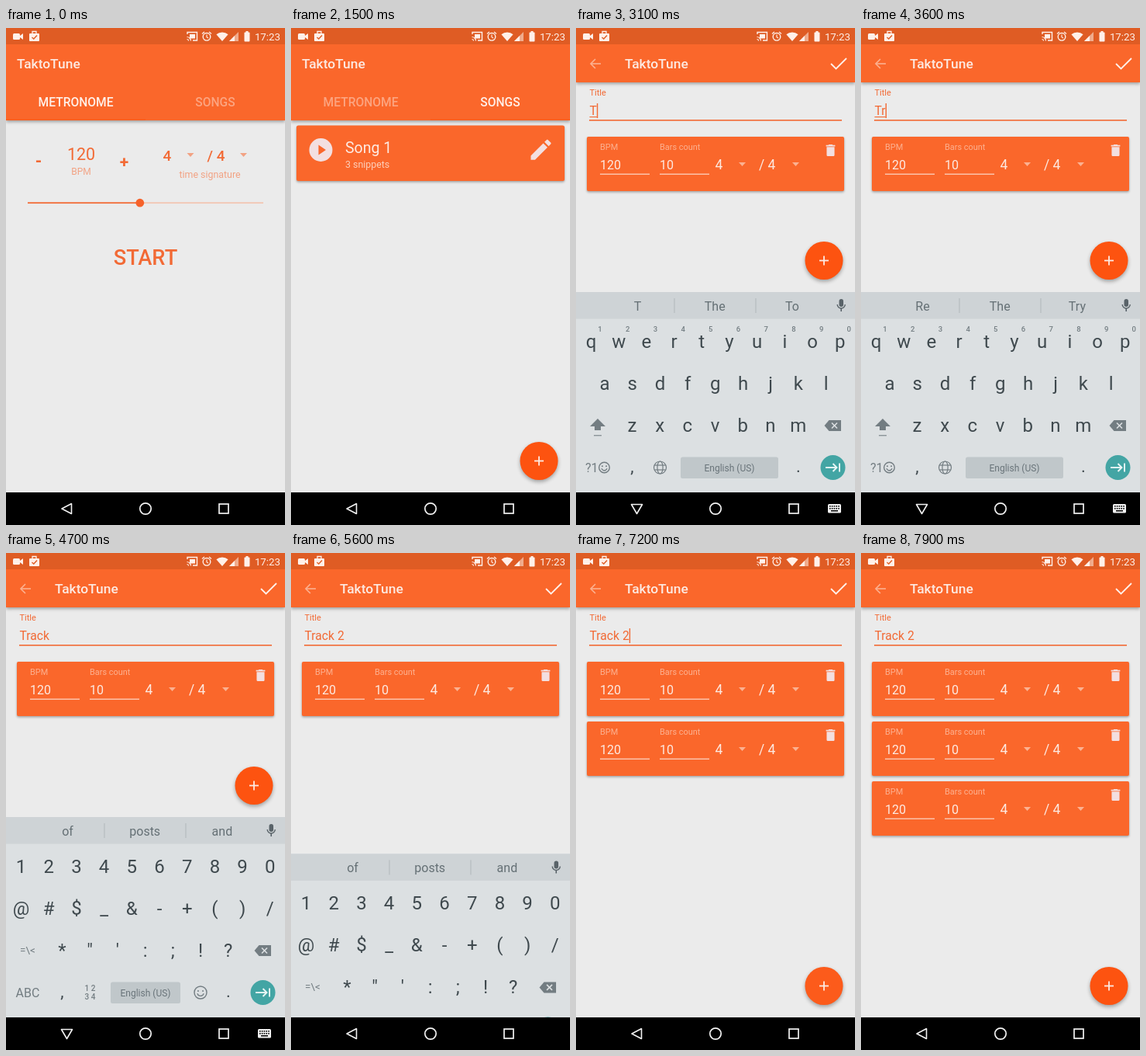
An HTML page with a canvas for the animation above (8 s loop, 360x640 px).

```html
<!DOCTYPE html>
<html lang="en">
<head>
<meta charset="utf-8">
<title>Metronome app</title>
<style>
html, body { margin: 0; width: 100%; height: 100%; overflow: hidden; background: #ebebeb; }
canvas { display: block; width: 360px; height: 640px; }
</style>
</head>
<body>
<canvas id="stage"></canvas>
<script>
const canvas = document.getElementById('stage');
const g = canvas.getContext('2d');
const dpr = window.devicePixelRatio || 1;
canvas.width = 360 * dpr;
canvas.height = 640 * dpr;

const LOOP = 8000, STEP = 100, TAU = Math.PI * 2;
const APP = 'TaktoTune';
const BG = '#ebebeb', BAR = '#fa672b', STATUS = '#df5c24', INK = '#f26a35';
const PALE = '#fdeae2', ICON = '#f3dfe0', KEY = '#3f494e', GREY = '#737d82';

const PENCIL = new Path2D('M3 17.25V21h3.75L17.81 9.94l-3.75-3.75zM20.71 7.04c.39-.39.39-1.02 0-1.41l-2.34-2.34c-.39-.39-1.02-.39-1.41 0l-1.83 1.83 3.75 3.75z');
const BIN = new Path2D('M6 19c0 1.1.9 2 2 2h8c1.1 0 2-.9 2-2V7H6zM19 4h-3.5l-1-1h-5l-1 1H5v2h14z');

const clamp = v => Math.min(1, Math.max(0, v));
const ramp = (t, from, to) => clamp((t - from) / (to - from));
const easeOut = v => 1 - (1 - v) ** 3;

function text(s, x, y, size, color, align = 'left', weight = 400) {
  g.font = `${weight} ${size}px Roboto, sans-serif`;
  g.textAlign = align;
  g.fillStyle = color;
  g.fillText(s, x, y);
}
function rect(x, y, w, h, color) {
  g.fillStyle = color;
  g.fillRect(x, y, w, h);
}
function round(x, y, w, h, r, color) {
  g.beginPath();
  g.roundRect(x, y, w, h, r);
  g.fillStyle = color;
  g.fill();
}
function disc(x, y, r, color) {
  g.beginPath();
  g.arc(x, y, r, 0, TAU);
  g.fillStyle = color;
  g.fill();
}
function ring(x, y, r, color, width, from = 0, to = TAU) {
  g.beginPath();
  g.arc(x, y, r, from, to);
  g.strokeStyle = color;
  g.lineWidth = width;
  g.stroke();
}
function trace(pts, close) {
  g.beginPath();
  for (let i = 0; i < pts.length; i += 2) g.lineTo(pts[i], pts[i + 1]);
  if (close) g.closePath();
}
function poly(color, ...pts) {
  trace(pts, true);
  g.fillStyle = color;
  g.fill();
}
function line(color, width, ...pts) {
  trace(pts);
  g.strokeStyle = color;
  g.lineWidth = width;
  g.stroke();
}
function icon(path, x, y, scale, color) {
  g.save();
  g.translate(x, y);
  g.scale(scale, scale);
  g.translate(-12, -12);
  g.fillStyle = color;
  g.fill(path);
  g.restore();
}
function shadowed(blur, dy, draw) {
  g.save();
  g.shadowColor = 'rgba(0,0,0,.32)';
  g.shadowBlur = blur * dpr;
  g.shadowOffsetY = dy * dpr;
  draw();
  g.restore();
}
function caret(x, y, color) {
  poly(color, x - 4.5, y - 2.5, x + 4.5, y - 2.5, x, y + 2.5);
}

function statusBar() {
  const c = '#fff0e9';
  rect(0, 0, 360, 21, STATUS);
  round(9, 7, 9, 8, 1.5, c);
  poly(c, 18, 10, 22, 7, 22, 15, 18, 12);
  round(30, 7, 13, 10, 1, c);
  line(c, 1.3, 34, 7, 34, 4.5, 39, 4.5, 39, 7);
  line(STATUS, 1.4, 33.5, 12, 35.8, 14, 40, 9.5);

  line(c, 1.4, 234, 8, 234, 5.5, 246.5, 5.5, 246.5, 16, 241, 16);
  rect(237, 8, 7, 5.5, c);
  ring(233.5, 16.5, 2, c, 1.2, -Math.PI / 2, 0);
  ring(233.5, 16.5, 5, c, 1.2, -Math.PI / 2, 0);
  ring(259, 11.3, 4.8, c, 1.4);
  line(c, 1.1, 259, 8.5, 259, 11.8, 261, 13);
  line(c, 1.3, 253, 7.5, 256, 5);
  line(c, 1.3, 262, 5, 265, 7.5);
  g.beginPath();
  g.moveTo(279, 17);
  g.arc(279, 17, 11.5, -Math.PI * .73, -Math.PI * .27);
  g.fillStyle = c;
  g.fill();
  poly('#f0ab8c', 288, 17, 300, 5, 300, 17);
  poly(c, 288, 17, 295, 10, 295, 17);
  round(307.5, 5.5, 7, 12, 1, c);
  rect(309.5, 4, 3, 2, c);
  text('17:23', 354, 16, 13.3, c, 'right');
}

function navBar(keys) {
  const c = '#f2f2f2';
  rect(0, 598, 360, 42, '#000');
  g.lineJoin = 'round';
  const tri = keys ? [71.5, 613.5, 85.5, 613.5, 78.5, 625.5] : [72, 619, 84.5, 612.5, 84.5, 625.5];
  line(c, 1.6, ...tri, tri[0], tri[1], tri[2], tri[3]);
  g.lineJoin = 'miter';
  ring(180, 619, 7.2, c, 1.7);
  g.strokeRect(275, 613, 12, 12);
  if (!keys) return;
  round(325, 613, 17, 11.5, 1.5, c);
  for (let r = 0; r < 2; r++)
    for (let i = 0; i < 5; i++) rect(327 + i * 2.8, 615 + r * 3, 1.6, 1.6, '#000');
  rect(329, 621, 9, 1.5, '#000');
}

function appBar(bottom) {
  shadowed(4, 2, () => rect(0, 21, 360, bottom - 21, BAR));
}

function fab(y, press, x = 320) {
  shadowed(5, 2.5, () => disc(x, y, 24.5, '#fd5310'));
  if (press) disc(x, y, 24.5, `rgba(240,190,160,${.3 * press})`);
  line(PALE, 1.8, x - 6, y, x + 6, y);
  line(PALE, 1.8, x, y - 6, x, y + 6);
}

function metronome() {
  const soft = '#f2a283';
  text('-', 42, 179, 22, INK, 'center', 700);
  text('120', 97, 170, 21.5, INK, 'center');
  text('BPM', 97, 188.5, 12, soft, 'center');
  text('+', 152.5, 179, 21, INK, 'center', 700);
  text('4', 202.5, 170.5, 19, INK, 'left', 500);
  caret(238, 163.5, soft);
  text('/ 4', 259.5, 170.5, 19, INK, 'left', 500);
  caret(306.5, 163.5, soft);
  text('time signature', 263, 193, 12.4, soft, 'center');
  rect(173, 224.3, 159, 1.8, '#f3c5b2');
  rect(28, 224.3, 145, 1.8, INK);
  disc(172.8, 225.2, 5.4, '#f6622a');
  text('START', 180, 304.5, 27.3, INK, 'center', 500);
}

function songs(press) {
  shadowed(3, 1.5, () => round(7, 125.5, 346, 71.5, 2.5, BAR));
  disc(38.5, 157, 15, ICON);
  poly(BAR, 35.5, 150.5, 35.5, 163.5, 45, 157);
  text('Song 1', 70, 161, 19.5, PALE);
  text('3 snippets', 70, 179.5, 12.4, '#fccfbb');
  icon(PENCIL, 322.5, 156.8, 1.45, ICON);
  fab(557.5, press);
}

function home(p, press) {
  rect(0, 21, 360, 577, BG);
  g.save();
  g.translate(-360 * p, 0);
  if (p < 1) metronome();
  g.translate(360, 0);
  if (p > 0) songs(press);
  g.restore();
  appBar(119);
  rect(180 * p, 117, 180, 2, '#fb6021');
  text(APP, 14, 52, 17.4, PALE, 'left', 500);
  text('METRONOME', 90, 101, 15.6, `rgba(255,240,233,${1 - .55 * p})`, 'center', 500);
  text('SONGS', 270, 101, 15.6, `rgba(255,240,233,${.45 + .55 * p})`, 'center', 500);
}

function snippet(y) {
  const soft = '#fcb191';
  shadowed(3, 1.5, () => round(14, y, 332, 70, 2, BAR));
  text('BPM', 31, y + 17, 10.9, soft);
  text('Bars count', 108, y + 17, 10.9, soft);
  text('120', 31, y + 42, 16, PALE);
  text('10', 108, y + 42, 16, PALE);
  rect(31, y + 47.6, 64, 1.2, '#fcd9ca');
  rect(108, y + 47.6, 64, 1.2, '#fcd9ca');
  text('4', 179.5, y + 42, 17.5, PALE);
  caret(214.5, y + 35.5, soft);
  text('/ 4', 236, y + 42, 17.5, PALE);
  caret(283.5, y + 35.5, soft);
  icon(BIN, 328.5, y + 17.5, .84, ICON);
}

function editor(s) {
  rect(0, 21, 360, 577, BG);
  appBar(70);
  line('#fcb191', 1.6, 32, 46, 19, 46);
  line('#fcb191', 1.6, 25, 40, 19, 46, 25, 52);
  text(APP, 63, 52, 17.4, PALE, 'left', 500);
  line('#fff0e9', 1.8, 329, 46, 335.5, 52.5, 349, 39);
  text('Title', 17.5, 87, 11, INK);
  text(s.title, 17.5, 112, 15.7, INK);
  const w = g.measureText(s.title).width;
  if (s.composing) rect(17.5, 114, w, 1.1, INK);
  if (s.cursor) rect(17.5 + w, 97, 1.4, 19, INK);
  rect(17, 118, 326, 1.6, INK);
  for (let i = 0; i < s.cards; i++) snippet(140 + 77 * i);
  fab(s.fabY, s.press);
}

function smiley(x, y, r) {
  ring(x, y, r, GREY, 1.4);
  disc(x - r * .38, y - r * .25, 1, GREY);
  disc(x + r * .38, y - r * .25, 1, GREY);
  ring(x, y, r * .55, GREY, 1.3, .3, Math.PI - .3);
}
function globe(x, y) {
  ring(x, y, 8, GREY, 1.2);
  g.beginPath();
  g.ellipse(x, y, 3.6, 8, 0, 0, TAU);
  g.stroke();
  for (const d of [-3, 3]) line(GREY, 1.2, x - 7.4, y + d, x + 7.4, y + d);
}
function keyRow(chars, x, y) {
  [...chars].forEach((c, i) => text(c, x + i * 35.7, y, 24, KEY, 'center'));
}

function keyboard(mode, words, shown) {
  g.save();
  g.beginPath();
  g.rect(0, 21, 360, 577);
  g.clip();
  g.translate(0, 258 * (1 - shown));
  rect(0, 340, 360, 258, '#dce0e2');
  rect(0, 340, 360, 34.5, '#ced3d6');
  words.forEach((w, i) => text(w, 79.5 + i * 99.7, 363.5, 16, '#657075', 'center'));
  rect(126.5, 348, 1, 19, '#b0b7ba');
  rect(231.5, 348, 1, 19, '#b0b7ba');
  round(339.5, 349, 5.5, 10, 2.7, '#596369');
  ring(342.2, 356, 5, '#596369', 1.4, 0, Math.PI);
  line('#596369', 1.6, 342.2, 361, 342.2, 365);

  const symbols = mode === 'symbols', caps = mode === 'caps';
  const set = s => caps ? s.toUpperCase() : s;
  if (symbols) {
    keyRow('1234567890', 19.5, 412);
    keyRow('@#$_&-+()/', 19.5, 466);
    keyRow('*"\':;!?', 72.5, 520);
    text('=\\<', 28, 516, 13.5, GREY, 'center');
    text('ABC', 28, 571.5, 16, GREY, 'center');
    text('1 2', 108.5, 564, 10, GREY, 'center', 500);
    text('3 4', 108.5, 575, 10, GREY, 'center', 500);
    smiley(251, 566, 8);
  } else {
    keyRow(set('qwertyuiop'), 19.5, 412);
    [...'1234567890'].forEach((c, i) => text(c, 31 + i * 35.7, 390.5, 9.5, GREY, 'center', 500));
    keyRow(set('asdfghjkl'), 37, 466);
    keyRow(set('zxcvbnm'), 72.5, 520);
    poly(caps ? '#43a5a4' : GREY, 28, 503, 38, 513, 32, 513, 32, 518, 24, 518, 24, 513, 18, 513);
    rect(23, 524, 10, 1.4, '#8b9498');
    text('?1', 12, 571.5, 16, GREY);
    smiley(36.5, 566, 6.8);
    globe(108.5, 566);
  }
  poly(GREY, 320.5, 512, 326.5, 505, 342, 505, 342, 519, 326.5, 519);
  line('#dce0e2', 1.6, 330, 508.5, 337, 515.5);
  line('#dce0e2', 1.6, 337, 508.5, 330, 515.5);
  text(',', 72.5, 572, 22, KEY, 'center');
  text('.', 287, 572, 22, KEY, 'center');
  const space = symbols ? 90 : 126;
  round(135, 552.5, space, 27.5, 2.5, '#c0c7ca');
  text('English (US)', 135 + space / 2, 570.5, 12, '#69747a', 'center');
  disc(331.5, 566, 16, '#43a5a4');
  line('#e8f6f5', 1.9, 322, 566, 336, 566);
  line('#e8f6f5', 1.9, 331.5, 561, 336.5, 566, 331.5, 571);
  line('#e8f6f5', 1.9, 340, 560.5, 340, 571.5);
  g.restore();
}

// [time, title, keyboard mode, suggestions]
const typing = [
  [0, '', 'caps', 'I The This'],
  [3100, 'T', 'letters', 'T The To'],
  [3400, 'Tr', 'letters', 'Re The Try'],
  [3700, 'Tra', 'letters', 'Train Try Travel'],
  [3900, 'Trac', 'letters', 'Trac Track Tracy'],
  [4100, 'Track', 'letters', 'Tracks Track Tracked'],
  [4200, 'Track ', 'letters', 'of posts and'],
  [4500, 'Track ', 'symbols', 'of posts and'],
  [5100, 'Track 2', 'symbols', 'of posts and']
];

function cursorOn(t) {
  if (t < 2700) return false;
  const reset = [5100, 4200, 4100, 3900, 3700, 3400, 3100, 2700].find(k => t >= k);
  return (t - reset) % 1000 < 500;
}
const tap = (t, from, hold, to) => ramp(t, from - 50, from + 150) * (1 - ramp(t, hold, to));

function draw(t) {
  g.setTransform(dpr, 0, 0, dpr, 0, 0);
  const keysUp = t >= 2700 && t < 5500;
  const enter = ramp(t, 1800, 2000);

  if (enter < 1) {
    home(easeOut(ramp(t, 450, 1100)), tap(t - 100, 1500, 1800, 2100));
  }
  if (enter > 0) {
    const [, title, mode, words] = typing.filter(e => t >= e[0]).pop();
    g.save();
    g.globalAlpha = enter;
    g.translate(0, 46 * (1 - ramp(t, 1800, 2250)) ** 3);
    editor({
      title,
      composing: t >= 3100 && t < 4200,
      cursor: cursorOn(t),
      cards: 1 + (t >= 6300) + (t >= 7400),
      fabY: t >= 2900 && t < 5500 ? 299.5 : 557.5,
      press: tap(t, 6100, 6300, 6700) + tap(t, 7200, 7400, 7800)
    });
    g.restore();
    const shown = easeOut(ramp(t, 2600, 2900)) * (1 - ramp(t, 5450, 5800) ** 2);
    if (shown > 0) keyboard(mode, words.split(' '), shown);
  }
  statusBar();
  navBar(keysUp);
}

const start = performance.now();
function tick(now) {
  const t = Math.max(0, now - start) % LOOP;
  draw(Math.floor(t / STEP) * STEP);
  requestAnimationFrame(tick);
}
draw(0);
requestAnimationFrame(tick);
</script>
</body>
</html>
```
